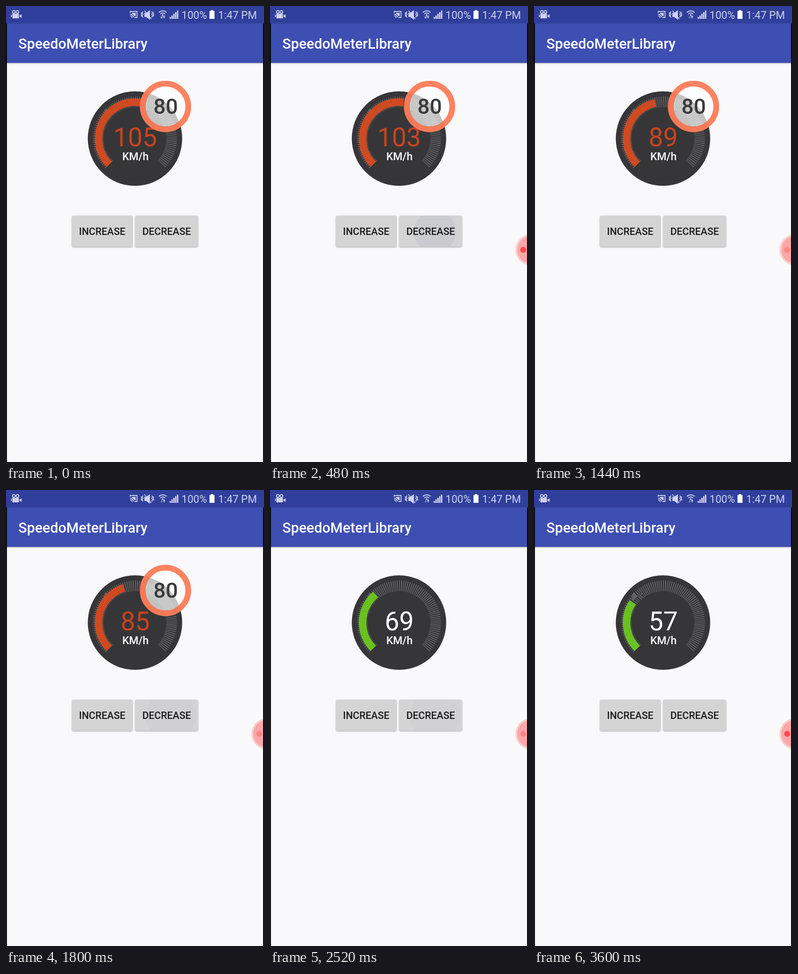
Write an HTML page that moves like this. It is 563 px wide and 994 px high and loops after 3640 ms.

```html
<!DOCTYPE html>
<html lang="en">
<head>
<meta charset="utf-8">
<title>SpeedoMeterLibrary</title>
<style>
  html, body { margin: 0; height: 100%; overflow: hidden; background: #f9f9fb; }
  svg { display: block; width: 100vw; height: 100vh; font-family: Roboto, "Noto Sans", sans-serif; }
  .medium { font-weight: 500; }
  .mid { text-anchor: middle; }
  .soft { filter: drop-shadow(0 1px 1.5px rgba(0, 0, 0, .35)); }
  .line { fill: none; stroke: #cdd2ec; stroke-width: 1.8; }
</style>
</head>
<body>
<svg viewBox="0 0 563 994">
  <defs>
    <clipPath id="screen"><rect x="2" y="38" width="559" height="956"/></clipPath>
    <clipPath id="button"><rect x="282" y="457" width="137" height="68" rx="3"/></clipPath>
  </defs>
  <rect width="563" height="994" fill="#000"/>
  <g clip-path="url(#screen)">
    <rect width="563" height="994" fill="#f9f9fb"/>
    <rect class="soft" y="30" width="563" height="94" fill="#3e4fb3"/>
  </g>
  <rect width="563" height="38" fill="#303f9b"/>
  <text class="medium" x="27" y="93" font-size="31" fill="#fff">SpeedoMeterLibrary</text>

  <g fill="#cdd2ec">
    <!-- camera -->
    <circle cx="17" cy="13" r="3" class="line"/>
    <circle cx="25" cy="13" r="3" class="line"/>
    <path d="M14 17h14v10h-14zM29 21l5-3v8l-5-3zM11 19h2v5h-2z"/>
    <!-- cast -->
    <path class="line" d="M271 15v-3h15v13h-6M271 18a7 7 0 0 1 7 7M271 21.5a4 4 0 0 1 4 4"/>
    <path d="M275 15h8v7h-3a9 9 0 0 0-5-5z"/>
    <!-- muted, vibrating -->
    <path d="M302 15h4l8-6v21l-8-6h-4z"/>
    <path class="line" d="M302 10l15 18M299 12l-2 3 2 3-2 3 2 4M295.500 14v9M318 12l2 3-2 3 2 3-2 4M322 14v9"/>
    <!-- wifi -->
    <path class="line" d="M333.500 14q8.500-7 17 0M336.500 17.500q5.500-4.500 11 0"/>
    <circle cx="342" cy="20" r="1.8"/>
    <path id="down" d="M337 24h2v-3h1.500v3h1.500l-2.500 4z"/>
    <path d="M342.500 24l2.500-4 2.500 4h-1.500v3h-2v-3z"/>
    <!-- signal, battery -->
    <path d="M357 24h3v4h-3zM361 20.500h3v7.500h-3zM365 17h3v11h-3zM369 13.500h3v14.500h-3zM373 10h3v18h-3z"/>
    <path d="M447 9h5v2h3v17h-11v-17h3z" fill="#fff"/>
    <text x="383" y="28" font-size="23">100%</text>
    <text x="463" y="28" font-size="23">1:47 PM</text>
  </g>

  <circle cx="281.500" cy="289" r="103" fill="#363638"/>
  <g fill="none" transform="rotate(135 281.500 289)">
    <circle cx="281.500" cy="289" r="80" pathLength="360" stroke="#626265" stroke-width="23" id="ticks"/>
    <circle cx="281.500" cy="289" r="79.500" pathLength="360" stroke-width="16.500" opacity=".93" id="arc"/>
  </g>
  <text class="mid" id="speed" x="282" y="306" font-size="56.500"></text>
  <text class="mid medium" x="282.500" y="336" font-size="23.500" fill="#fff">KM/h</text>

  <g id="sign">
    <circle cx="348" cy="219" r="44" fill="#fff" opacity=".7"/>
    <circle cx="348" cy="219" r="49.700" fill="none" stroke="#ff7d59" stroke-width="12.500" opacity=".95"/>
    <text class="mid medium" x="348.500" y="235" font-size="47" fill="#3a3a3b">80</text>
  </g>

  <g fill="#d4d4d5" class="soft">
    <rect x="144" y="457" width="132" height="68" rx="3"/>
    <rect x="282" y="457" width="137" height="68" rx="3"/>
  </g>
  <circle id="ripple" cx="360" cy="492" fill="#6a6aa0" clip-path="url(#button)"/>
  <g class="mid medium" font-size="21.700" fill="#1c1c1d">
    <text x="210" y="499">INCREASE</text>
    <text x="350.500" y="499">DECREASE</text>
  </g>

  <g id="recorder" clip-path="url(#screen)">
    <circle cx="569" cy="531.500" r="33.500" fill="#fbcfcd"/>
    <circle cx="569" cy="531.500" r="29.500" fill="#ffa6a8"/>
    <circle id="dot" cx="552.500" cy="531.500" r="6.500"/>
  </g>
</svg>
<script>
const LOOP = 3640, DROP = 16, DURATION = 732, BLINK = 260, LIMIT = 80;
const PRESSES = [310, 1557, 2285];
const DEG_PER_KMH = 1.38;

const el = id => document.getElementById(id);
const set = (id, attrs) => {
  for (const name in attrs) el(id).setAttribute(name, attrs[name]);
};
const clamp = x => Math.min(1, Math.max(0, x));
const ease = x => (1 - Math.cos(Math.PI * clamp(x))) / 2;
const show = visible => ({ visibility: visible ? "visible" : "hidden" });

// 90 dashes over 270 degrees, then a gap
set("ticks", { "stroke-dasharray": "1.3 1.7 ".repeat(90) + "0 90" });

function draw(t) {
  const speed = PRESSES.reduce((v, start) => v - DROP * ease((t - start) / DURATION), 105);
  const shown = Math.round(speed);
  const over = shown > LIMIT;
  el("speed").textContent = shown;
  set("speed", { fill: over ? "#c8431f" : "#fff" });
  set("arc", {
    stroke: over ? "#da4a1f" : "#6bcb1c",
    "stroke-dasharray": `${shown * DEG_PER_KMH} 360`
  });
  set("sign", show(over));

  const press = PRESSES.findLast(start => t >= start - 40) ?? Infinity;
  const age = clamp((t - press + 40) / 320);
  set("ripple", { r: 18 + 42 * age, opacity: age ? 0.26 * (1 - age) : 0 });

  set("recorder", show(t >= 160));
  const lit = Math.floor((t - 480) / BLINK) % 2 === 0;
  set("dot", { fill: lit ? "#ff4a4e" : "#ff8584" });
  set("down", { opacity: t < 1400 ? 1 : 0.5 });
}

function tick(now) {
  draw(Math.floor(now % LOOP / 40) * 40);
  requestAnimationFrame(tick);
}
draw(0);
requestAnimationFrame(tick);
</script>
</body>
</html>
```
